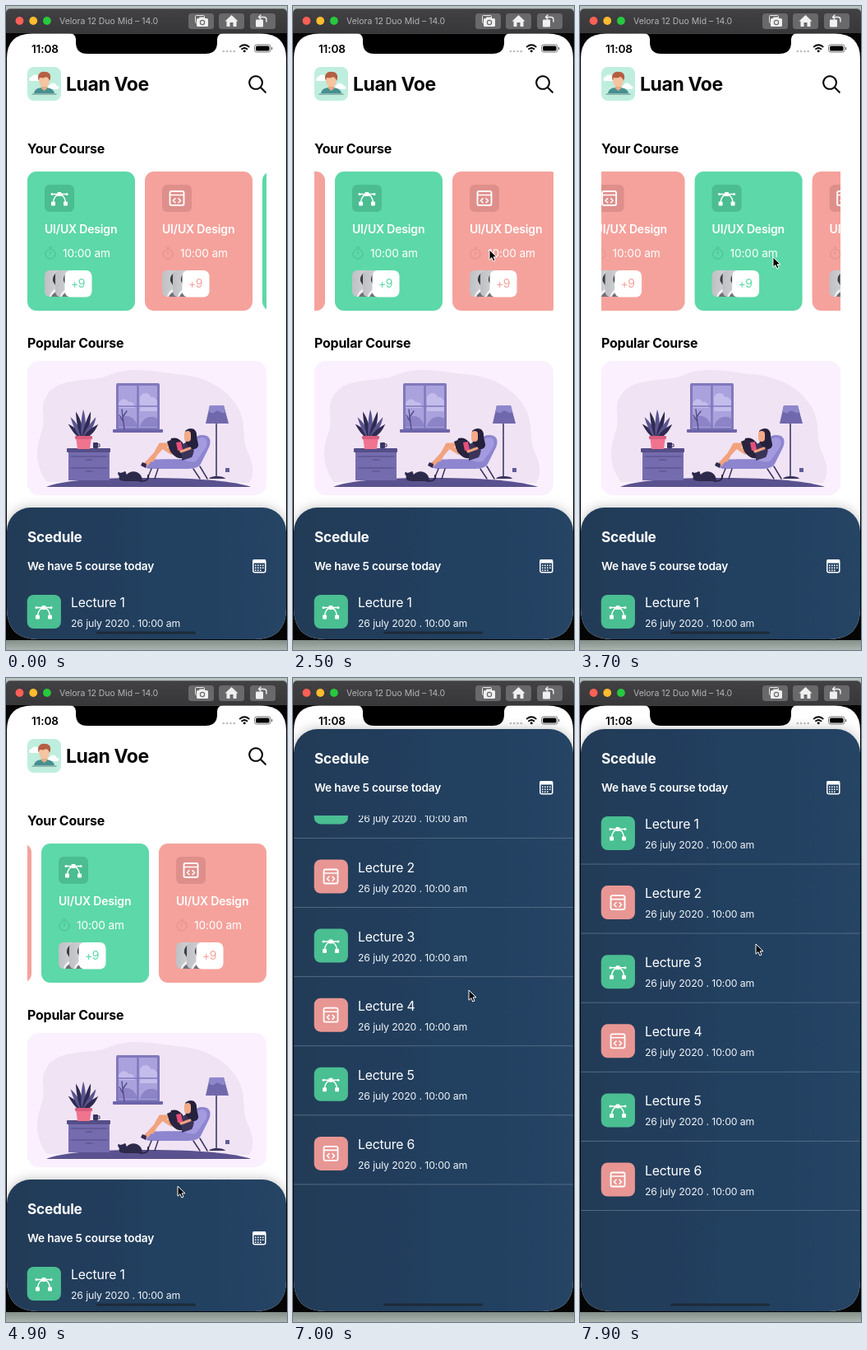
Write an HTML page that moves like this. It is 342x782 px and loops after 8000 ms.

```html
<!DOCTYPE html>
<html lang="en">
<head>
<meta charset="utf-8">
<style>
html, body { margin: 0; width: 100%; height: 100%; overflow: hidden; background: #000; }
svg { display: block; width: 342px; height: 782px; font-family: Inter, "Open Sans", sans-serif; }
.h2 { font-size: 15.9px; font-weight: 700; letter-spacing: -.18px; }
.line { fill: none; stroke-linecap: round; stroke-linejoin: round; }
</style>
</head>
<body>
<svg id="stage" viewBox="0 0 342 782"></svg>
<script>
const GREEN = '#5dd8a8', PINK = '#f5a29c';
const rect = (x, y, w, h, r, fill, extra = '') =>
  `<rect x="${x}" y="${y}" width="${w}" height="${h}" rx="${r}" fill="${fill}" ${extra}/>`;
const circle = (x, y, r, fill) => `<circle cx="${x}" cy="${y}" r="${r}" fill="${fill}"/>`;
const path = (d, fill) => `<path d="${d}" fill="${fill}"/>`;
const line = (d, stroke, width = 1.8) =>
  `<path class="line" d="${d}" stroke="${stroke}" stroke-width="${width}"/>`;
const text = (x, y, size, weight, fill, str, spacing = -.18) =>
  `<text x="${x}" y="${y}" font-size="${size}" font-weight="${weight}" fill="${fill}" letter-spacing="${spacing}">${str}</text>`;
const at = (x, y, body) => `<g transform="translate(${x} ${y})">${body}</g>`;
const repeat = (n, fn) => Array.from({ length: n }, (_, i) => fn(i)).join('');

const curveIcon = line('M-9-5H9M-7.5 5C-7-1-4-4 0-5C4-4 7-1 7.5 5', '#fff', 1.5)
  + rect(-2.5, -7.5, 5, 5, 1, '#fff') + circle(-9, -5, 1.5, '#fff') + circle(9, -5, 1.5, '#fff')
  + rect(-10, 4, 5, 5, 1, '#fff') + rect(5, 4, 5, 5, 1, '#fff');
const codeIcon = rect(-8.5, -8.5, 17, 17, 2, 'none', 'stroke="#fff" stroke-width="1.8"')
  + line('M-8-4H8M-2 .2L-4.5 2.7L-2 5.2M2 .2L4.5 2.7L2 5.2', '#fff', 1.6);
const icon = i => i % 2 ? codeIcon : curveIcon;

const portrait = x => at(x, 321,
  rect(0, 0, 30, 32, 6, 'url(#photo)') +
  path('M6 32C7 27 10 24 14 22L13 14H26V32Z', '#f0f0f1') +
  path('M10 13C9 4 17 0 24 4V13C20 9 15 9 13 18Z', '#3c3c42') +
  path('M8 32C10 28 13 26 16 25L18 32Z', '#6f7077'));

const card = i => {
  const color = i % 2 ? PINK : GREEN, dark = i % 2 ? '#df8f8b' : '#4bbd91';
  return at(26 + 143 * i, 0,
    rect(0, 201, 131, 169, 11, color) + rect(21, 217, 36, 33, 6, dark) + at(39, 233.5, icon(i)) +
    text(21, 276, 14, 600, '#fff', 'UI/UX Design') +
    line('M28 295a6 6 0 1 0 .1 0M28 301V298M26.5 293H29.5', dark, 1) +
    text(43, 305, 13.7, 400, '#fff', '10:00 am', -.12) +
    portrait(21) + portrait(34) + rect(45.5, 321, 33, 32.5, 7, '#fff') +
    text(53, 342, 14, 400, color, '+9', -.5));
};

const row = i => at(0, 84.1 * i,
  rect(25.7, 106, 41.2, 41, 8, i % 2 ? '#e89693' : '#4abf92') + at(46, 126.5, icon(i)) +
  text(79, 121, 15.8, 400, '#fff', 'Lecture ' + (i + 1), -.2) +
  text(79, 145, 12.3, 400, '#eef3f8', '26 july 2020 . 10:00 am', -.13) +
  rect(0, 163.5, 342, 1, 0, '#516a84'));

const calendar = rect(300.8, 63.8, 15, 15, 2, 'none', 'stroke="#fff" stroke-width="1.5"')
  + rect(300.5, 63, 15.5, 4.5, 1, '#fff')
  + repeat(11, i => rect(303 + 3 * (i % 4), 69.5 + 3 * (i >> 2), 1.6, 1.6, 0, '#fff'));

const avatar = rect(26, 74, 41, 41, 8, '#bfeede')
  + path('M29 91a3 3 0 0 1 2-5a5 5 0 0 1 9 0a3 3 0 0 1 1 5ZM52 101a3 3 0 0 1 1-5a5 5 0 0 1 9 1a2 2 0 0 1 1 4Z', '#fff')
  + path('M34 106C35 100 40 99 46 99S58 100 59 106Z', '#488f91')
  + path('M43 94H50V100L46.5 103L43 100Z', '#e9ac85') + rect(40.5, 84, 12, 14, 5.5, '#f5c4a0')
  + path('M40 91C37 83 42 79 47 80C53 79 56 85 53 91C52 88 51 87 49 86C46 88 43 87 41 87Z', '#b45f42')
  + line('M32 107H61', '#577f7f', 1);

const plant = repeat(7, i => {
  const tall = 25 + 11 * Math.cos((i - 3) / 2);
  return `<path transform="translate(94 526) rotate(${i * 15 - 45})" d="M-1.5 0C-4-12-2-${tall - 8} 0-${tall}C3-${tall - 8} 4-12 1.5 0Z" fill="${i % 2 ? '#5a5390' : '#2e2b50'}"/>`;
});

const room = rect(26, 431, 291, 163, 14, '#fbf0fe')
  + path('M50 578C32 555 38 532 44 515C49 498 40 489 49 474C63 450 98 457 121 450C151 436 179 444 207 447C240 449 269 463 283 489C293 507 286 526 295 543C302 559 302 570 296 579Z', '#f0e3f4')
  + path('M49 584C67 576 112 573 172 573S280 577 298 584Z', '#59528e')
  // window
  + rect(134, 458, 53, 57, 2, '#8078bd') + rect(137, 461, 47, 51, 1, '#aaa2dc')
  + path('M137 483c3-8 10-6 12-2c5-1 8 3 8 7H137ZM163 475c4-8 12-5 13 0c4-1 7 2 8 5v12H163Z', '#c4bdec')
  + path('M137 511V500C147 495 157 498 160 511ZM163 511C166 500 176 496 184 501V511Z', '#8c84c7')
  + line('M160.5 460V512', '#8078bd', 2.5) + line('M137 486H184', '#8078bd', 1.4) + rect(130, 514, 61, 4, 1, '#6d65aa')
  + line('M144 514L141 490M142 499L147 492M143 505L138 497', '#514981', 1.3)
  // dresser and plant
  + rect(76, 541, 50, 35, 0, '#746cae') + rect(74, 537, 53, 5, 1, '#554e88')
  + line('M79 547H123M79 561H123M97 551H105M97 565H105', '#514a84', 1.2)
  + plant + path('M85 523H104L102 538H87Z', '#f0738f') + rect(84, 522, 21, 4, 1, '#d95d7e')
  + rect(106, 530, 6, 7, 1, '#393563') + line('M112 532h2v3h-2', '#393563', 1)
  // lamp
  + line('M256 506V573', '#3d3867', 1.6) + path('M248 485H265L271 507H243Z', '#7068ac')
  + path('M248 485H265L267 493C261 497 260 488 254 493C251 497 249 491 246 494Z', '#8f87cc')
  + path('M247 574C249 570 265 570 267 574Z', '#393563') + rect(267, 561, 5, 5, 0, '#625c99')
  // sofa and reader
  + path('M170 553C178 549 203 551 216 550C222 535 225 522 238 521C249 520 251 529 246 538L237 556C233 563 222 562 214 562H176C168 562 166 556 170 553Z', '#8e85cf')
  + path('M216 551C223 537 227 526 238 524C246 524 246 532 242 538L232 552C226 555 221 553 216 551Z', '#a39ae0')
  + line('M177 562L172 574M185 562L181 574M228 562L236 574M236 559L245 574', '#39335f', 1.5)
  + path('M201 525C210 522 218 531 218 540L205 546L198 537Z', '#211d37')
  + line('M202 533L188 533L178 551M201 542L190 535L171 556', '#f1a37e', 5)
  + path('M166 554l5 2l-1 5l-6-3Z', '#302a4c')
  + path('M196 529C206 524 214 528 220 539L217 548C210 552 204 546 200 541Z', '#29243f')
  + path('M214 533L220 529C229 531 231 539 226 548L214 552Z', '#3b3459')
  + path('M218 516C224 510 233 513 232 522C233 531 237 535 230 538C221 539 217 531 218 516Z', '#25203c')
  + rect(217, 516, 8, 13, 4, '#f3aa87') + line('M224 537L213 541L211 533', '#f1a37e', 3)
  + path('M207 530l6-1l2 10l-6 1Z', '#e6507c')
  // cat
  + path('M138 571C135 568 136 564 139 567L143 566C146 563 146 568 147 569C153 562 166 565 166 577H145C137 577 137 573 138 571Z', '#2d294b')
  + line('M163 577C172 577 174 574 173 570', '#2d294b', 2);

const chrome = rect(0, 0, 342, 20, 0, '#b5c2be') + rect(0, 768, 342, 14, 0, 'url(#desk)')
  + rect(0, 3, 342, 40, 5, '#666668') + rect(0, 4, 342, 40, 5, 'url(#bar)')
  + ['#ff5f57', '#febc2e', '#28c840'].map((c, i) => circle(16.5 + 16.7 * i, 18, 4.9, c)).join('')
  + text(65, 22, 10.5, 400, '#b4b4b5', 'Velora 12 Duo Mid – 14.0', -.03)
  + [222, 259, 297].map(x => rect(x, 9, 31, 19, 3.5, '#69696b')).join('')
  + rect(230.5, 11.5, 11, 9, 1, 'none', 'stroke="#e8e8e8"') + rect(232, 15, 14, 10, 1.5, '#f0f0f0')
  + rect(235, 13.5, 7, 3, 1, '#f0f0f0') + circle(239, 20, 3.2, '#69696b') + circle(239, 20, 2, '#f0f0f0')
  + path('M274.5 11L282.5 18.5H280.5V25H276.5V20H272.5V25H268.5V18.5H266.5Z', '#f0f0f0')
  + rect(304, 16.5, 9, 9, 1, '#f0f0f0') + line('M308 13.5H314Q317 13.5 317 17V19M310 11L307.5 13.5L310 16', '#f0f0f0', 1.4)
  + rect(0, 33, 342, 737, 0, '#050505');

const status = path('M77 33Q84 33 85 40V44Q85 58 99 58H243Q257 58 257 44V40Q258 33 265 33Z', '#000')
  + text(31, 57, 13.6, 600, '#000', '11:08', -.15)
  + repeat(4, i => circle(264.8 + 4.3 * i, 55, 1.3, '#bbb'))
  + line('M284.7 49.5Q290.2 45 295.7 49.5M287 52.3Q290.2 49.7 293.4 52.3', '#000', 1.8) + circle(290.2, 54.7, 1.5, '#000')
  + rect(302.5, 47, 19.5, 9, 2.6, 'none', 'stroke="#777" stroke-width="1"') + rect(304, 48.5, 16.5, 6, 1.5, '#000')
  + rect(323, 50, 1.3, 3.2, .6, '#777');

const home = avatar + text(73, 103, 23, 700, '#050505', 'Luan Voe', -.4)
  + line('M304 85.2a7.8 7.8 0 1 0 .1 0M309.8 98.8L315.8 104.8', '#050505', 2.1)
  + '<text class="h2" x="26" y="179">Your Course</text><text class="h2" x="26" y="415">Popular Course</text>'
  + `<g clip-path="url(#strip)"><g id="cards">${repeat(6, card)}</g></g>` + room;

const sheet = rect(1, 0, 340, 800, 29, 'url(#navy)', 'filter="url(#shadow)"')
  + text(26, 42, 17.2, 700, '#fff', 'Scedule', -.2)
  + text(26, 76, 13.7, 600, '#fff', 'We have 5 course today', -.2) + calendar
  + `<g clip-path="url(#listBox)"><g id="list">${repeat(6, row)}</g></g>`;

const stops = (id, dir, ...colors) => `<linearGradient id="${id}" x2="${dir}" y2="${1 - dir}">`
  + colors.map((c, i) => `<stop offset="${i / (colors.length - 1)}" stop-color="${c}"/>`).join('') + '</linearGradient>';
const clip = (id, body) => `<clipPath id="${id}">${body}</clipPath>`;

const stage = document.getElementById('stage');
stage.innerHTML = `<defs>
  ${stops('desk', 0, '#7d8884', '#a9b5ae')}${stops('bar', 0, '#414043', '#343336')}
  ${stops('navy', 1, '#213b58', '#233f5e', '#254465')}${stops('photo', 1, '#bfc0c4', '#dedfe2')}
  ${clip('screen', '<path d="M1 64Q1 33.5 32 33.5H310Q341 33.5 341 64V731Q341 769 303 769H39Q1 769 1 731Z"/>')}
  ${clip('strip', rect(26, 195, 291, 180, 0, '#000'))}${clip('listBox', rect(0, 105, 342, 700, 0, '#000'))}
  <filter id="shadow" x="-10%" y="-10%" width="120%" height="120%"><feDropShadow dx="0" dy="0" stdDeviation="7" flood-opacity=".25"/></filter>
</defs>${chrome}
<g clip-path="url(#screen)">${rect(0, 33, 342, 737, 0, '#fff')}${home}${status}
<g id="sheet">${sheet}</g>${rect(110, 759.5, 121, 3, 1.5, '#1d2a39')}</g>
<path id="cursor" d="M0 0V12.2L2.9 9.6L4.8 14L7 13L5.1 8.8H9Z" fill="#000" stroke="#fff" stroke-width="1"/>`;

const clamp = p => Math.min(1, Math.max(0, p));
const easeOut = p => 1 - (1 - p) ** 3;
const smooth = p => p * p * (3 - 2 * p);
const glide = (t, start, length, ease = easeOut) => ease(clamp((t - start) / length));

// time, x, y of the pointer tip
const pointer = [
  [1000, 360, 700], [1800, 244, 300], [1900, 244, 300], [2150, 100, 306], [2450, 239, 296],
  [2700, 239, 296], [3000, 125, 310], [3350, 125, 310], [3700, 235, 305], [4000, 110, 312],
  [4300, 110, 312], [4800, 209, 617], [4950, 209, 617], [5200, 210, 409], [6350, 210, 409],
  [6650, 214, 440], [6800, 214, 440], [7000, 214, 379], [7250, 214, 323]];

function pointerAt(t) {
  const next = pointer.findIndex(k => k[0] > t);
  if (next < 1) return (next ? pointer.at(-1) : pointer[0]).slice(1);
  const [a, b] = [pointer[next - 1], pointer[next]];
  const p = smooth((t - a[0]) / (b[0] - a[0]));
  return [1, 2].map(i => a[i] + (b[i] - a[i]) * p);
}

const move = (id, x, y) => document.getElementById(id).setAttribute('transform', `translate(${x} ${y})`);

function frame(now) {
  const t = now % 8000;
  move('cards', -261 * glide(t, 1900, 550) - 197 * glide(t, 2700, 900) - 97 * glide(t, 3700, 700), 0);
  move('sheet', 0, 609 - 547 * glide(t, 4950, 910));
  move('list', 0, -36 * (glide(t, 6850, 300) - glide(t, 7200, 500, smooth)));
  move('cursor', ...pointerAt(t));
  requestAnimationFrame(frame);
}
frame(performance.now());
</script>
</body>
</html>
```
